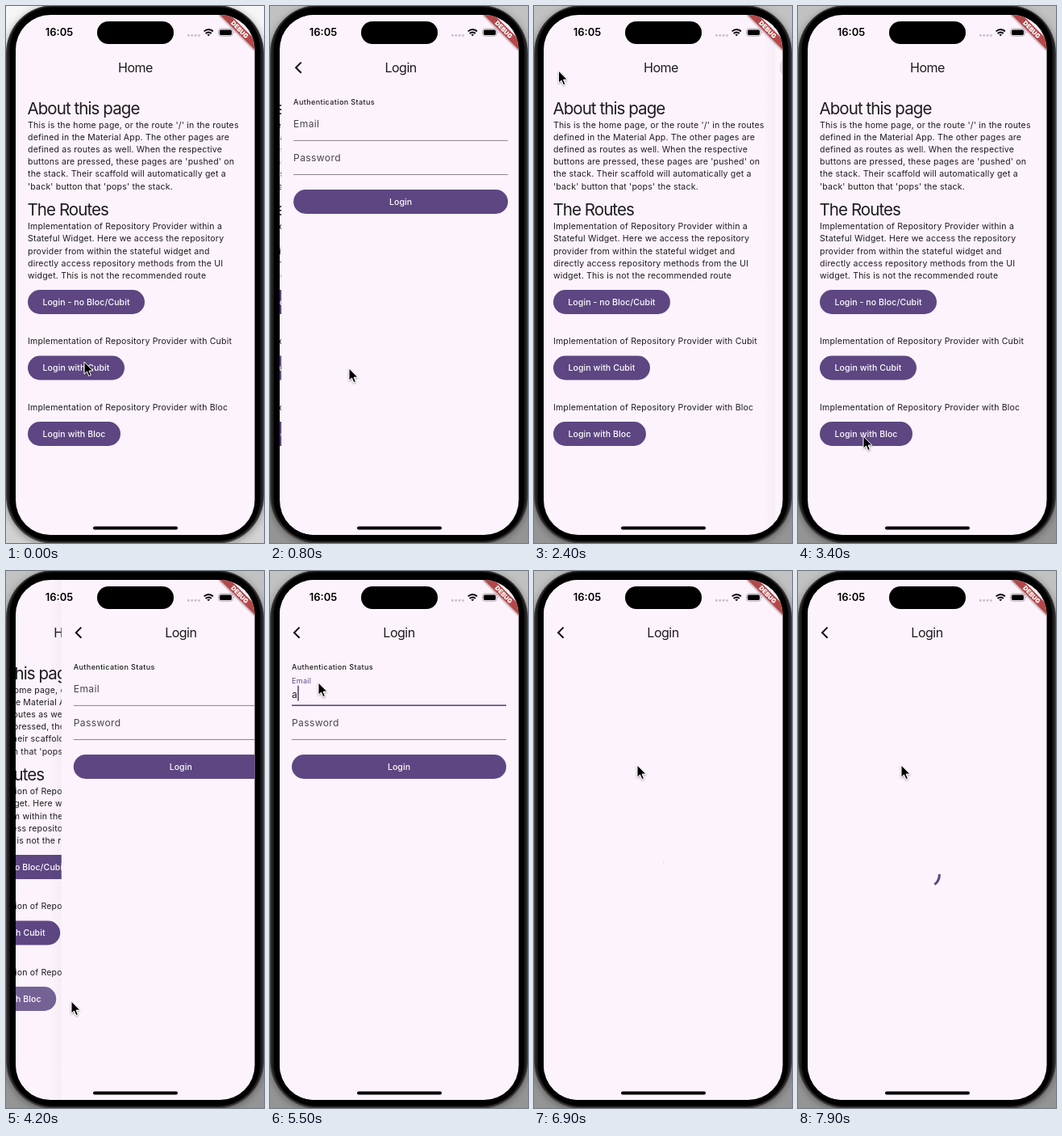
These frames come from a looping animation (320x664 px, 8000 ms). An HTML page:

```html
<!DOCTYPE html>
<html lang="en">
<head>
<meta charset="utf-8">
<title>Login demo</title>
<style>
html, body { margin: 0; width: 100%; height: 100%; overflow: hidden; }
svg { display: block; width: 320px; height: 664px; font-family: Inter, sans-serif; fill: #1d1b20; }
.title { font-size: 16px; letter-spacing: -.5px; text-anchor: middle; }
.head { font-size: 20.5px; letter-spacing: -.92px; }
.body { font-size: 10.54px; letter-spacing: .19px; }
.btn { font-size: 10.54px; letter-spacing: .08px; font-weight: 500; fill: #fff; text-anchor: middle; }
.status { font-size: 9.04px; letter-spacing: .38px; font-weight: 500; }
.field { font-size: 12.05px; letter-spacing: .38px; }
.primary { fill: #5d4682; }
.page { fill: #fdf3fc; }
</style>
</head>
<body>
<svg viewBox="0 0 320 664">
  <defs>
    <clipPath id="screen"><rect x="12" y="11" width="296.5" height="643" rx="43"/></clipPath>
    <linearGradient id="desk" x2="0" y2="1">
      <stop id="deskTop"/><stop id="deskEnd" offset="1"/>
    </linearGradient>
    <linearGradient id="edge">
      <stop stop-opacity="0"/><stop offset="1" stop-opacity=".03"/>
    </linearGradient>
    <filter id="soft" x="-50%" y="-50%" width="200%" height="200%">
      <feDropShadow dx="0" dy="1" stdDeviation="1.2" flood-opacity=".4"/>
    </filter>
    <filter id="shade" x="-10%" y="-10%" width="120%" height="120%">
      <feDropShadow dx="0" dy="2" stdDeviation="5" flood-opacity=".35"/>
    </filter>
  </defs>
  <rect width="320" height="664" fill="url(#desk)"/>
  <rect y="-1" width="320" height="666" rx="59" fill="#454142" filter="url(#shade)"/>
  <rect x="1.5" y="0" width="317" height="663" rx="57" fill="#201e1f"/>
  <rect x="4.5" y="1.5" width="311" height="660" rx="53" fill="#000"/>
  <g clip-path="url(#screen)">
    <g id="home"><rect class="page" x="12" y="11" width="297" height="643"/></g>
    <g id="login">
      <rect x="-3" y="11" width="15" height="643" fill="url(#edge)"/>
      <rect class="page" x="12" y="11" width="297" height="643"/>
      <circle id="backGlow" cx="33" cy="76" r="15.5" fill="#49454f"/>
      <path d="M36.6 69.6L30 76.2l6.6 6.6" fill="none" stroke="#111" stroke-width="2"/>
      <text class="title" x="160" y="82">Login</text>
      <g id="form"><text class="status" x="27" y="121.5">Authentication Status</text></g>
      <path id="arc" fill="none" stroke="#5d4682" stroke-width="3"/>
    </g>
    <g transform="translate(308 11) rotate(45)">
      <rect x="-32" y="21" width="64" height="9.2" fill="#b4474a" filter="url(#soft)"/>
      <text y="28.4" text-anchor="middle" font-size="7.7" font-weight="900" fill="#fff">DEBUG</text>
    </g>
  </g>
  <rect x="113" y="19" width="95" height="28" rx="14" fill="#000"/>
  <text x="66" y="37.3" text-anchor="middle" font-size="13" font-weight="600" fill="#000">16:05</text>
  <path d="M226.2 36.4h13.6" stroke="#c9b8cb" stroke-width="2.8" stroke-linecap="round" stroke-dasharray="0 4.4"/>
  <g fill="none" stroke="#000" stroke-width="1.9">
    <path d="M245.6 31.4q5.6-4.8 11.2 0M247.6 33.9q3.6-3 7.2 0"/>
    <path d="M249.3 35.3q1.9-1.3 3.8 0l-1.9 1.9z" fill="#000" stroke="none"/>
  </g>
  <rect x="263.6" y="28.2" width="17.6" height="9" rx="2.8" fill="none" stroke="#a89ba8" stroke-width=".9"/>
  <rect x="264.9" y="29.5" width="15" height="6.4" rx="1.6" fill="#000"/>
  <path d="M282.3 31.2q1.6 1.5 0 3z" fill="#a89ba8"/>
  <rect x="108" y="643.6" width="105" height="3.8" rx="1.9" fill="#000"/>
  <circle id="ring" r="22" fill="none" stroke="#222" stroke-width="2"/>
  <path id="pointer" d="M0 0v15.2l3.5-3.2 2.4 5.6 2.5-1.1-2.4-5.4h4.9z" fill="#000" stroke="#fff" stroke-width="1" filter="url(#soft)"/>
</svg>
<script>
const $ = id => document.getElementById(id);
const clamp = x => Math.max(0, Math.min(1, x));
const ramp = (t, start, length) => clamp((t - start) / length);

function add(parent, tag, attrs, text = '') {
  const node = document.createElementNS('http://www.w3.org/2000/svg', tag);
  for (const key in attrs) node.setAttribute(key, attrs[key]);
  node.textContent = text;
  return parent.appendChild(node);
}
const lines = (list, y) => list.forEach((line, i) =>
  add(home, 'text', { class: 'body', x: 27, y: y + i * 15.06 }, line));

// Returns the light overlay shown while the button is pressed.
function button(parent, y, width, label) {
  const box = { x: 27, y, width, height: 30, rx: 15 };
  add(parent, 'rect', { ...box, class: 'primary' });
  const glow = add(parent, 'rect', { ...box, fill: '#fff', opacity: 0 });
  add(parent, 'text', { class: 'btn', x: 27 + width / 2, y: y + 18.8 }, label);
  return glow;
}

const home = $('home'), login = $('login'), form = $('form');
add(home, 'text', { class: 'title', x: 160.5, y: 82 }, 'Home');
add(home, 'text', { class: 'head', x: 26.5, y: 134 }, 'About this page');
lines(["This is the home page, or the route '/' in the routes",
  'defined in the Material App. The other pages are',
  'defined as routes as well. When the respective',
  "buttons are pressed, these pages are 'pushed' on",
  'the stack. Their scaffold will automatically get a',
  "'back' button that 'pops' the stack."], 151.2);
add(home, 'text', { class: 'head', x: 26.5, y: 259 }, 'The Routes');
lines(['Implementation of Repository Provider within a',
  'Stateful Widget. Here we access the repository',
  'provider from within the stateful widget and',
  'directly access repository methods from the UI',
  'widget. This is not the recommended route'], 276.4);
lines(['Implementation of Repository Provider with Cubit'], 418.2);
lines(['Implementation of Repository Provider with Bloc'], 499.8);
button(home, 351, 145, 'Login - no Bloc/Cubit');
const cubitGlow = button(home, 432.5, 120, 'Login with Cubit');
const blocGlow = button(home, 514, 115, 'Login with Bloc');
const loginGlow = button(form, 227, 266, 'Login');

function field(label, y, focus, blur, keys) {
  const name = add(form, 'text', { class: 'field' }, label);
  const value = add(form, 'text', { class: 'field', x: 27, y: y - 9.4 });
  const rule = add(form, 'rect', { x: 27, width: 266 });
  const caret = add(form, 'rect', { y: y - 24.5, width: 1.6, height: 19, class: 'primary' });
  return t => {
    const active = t >= focus && t < blur;
    const k = ramp(t, focus, 167), lift = k * k * (3 - 2 * k);
    const typed = keys.filter(key => t >= key);
    const lastInput = Math.max(focus, ...typed);
    name.setAttribute('transform', `translate(27 ${y - 16.1 - 11.6 * lift}) scale(${1 - .25 * lift})`);
    name.setAttribute('fill', active ? '#5d4682' : '#49454f');
    value.textContent = 'asd'.slice(0, typed.length);
    rule.setAttribute('y', active ? y - .8 : y - .3);
    rule.setAttribute('height', active ? 1.6 : .8);
    rule.setAttribute('fill', active ? '#5d4682' : '#6f6a73');
    caret.setAttribute('x', 27 + (typed.length ? value.getComputedTextLength() : 0));
    caret.setAttribute('opacity', +(active && (t - lastInput) % 1000 < 500));
  };
}
const fields = [
  field('Email', 166.2, 5000, 6040, [5420, 5560, 5680]),
  field('Password', 208.4, 6040, 9000, [6260, 6380, 6480])
];

function bezier(x1, y1, x2, y2) {
  const at = (a, b, u) => 3 * a * u * (1 - u) ** 2 + 3 * b * u * u * (1 - u) + u ** 3;
  return x => {
    let low = 0, high = 1;
    for (let i = 0; i < 24; i++) {
      const mid = (low + high) / 2;
      if (at(x1, x2, mid) < x) low = mid; else high = mid;
    }
    return at(y1, y2, low);
  };
}
const standard = bezier(.4, 0, .2, 1);
// Page slide: two cubic pieces that join at (.198, .541).
const JX = .198, JY = .541;
const slideIn = bezier(.056 / JX, .024 / JY, .108 / JX, .3085 / JY);
const slideOut = bezier((.3655 - JX) / (1 - JX), 1, (.5465 - JX) / (1 - JX), (.989 - JY) / (1 - JY));
const slide = x => x <= 0 ? 0 : x >= 1 ? 1 : x < JX ? JY * slideIn(x / JX)
  : JY + (1 - JY) * slideOut((x - JX) / (1 - JX));

const PUSH = 415, POP = 2110, PUSH_AGAIN = 4034.5, LOADING = 6897;
const clicks = [[220, PUSH], [1880, 2150], [3860, PUSH_AGAIN], [4880, 5010], [5960, 6060], [6740, 6890]];
// Pointer moves: start, end, x, y.
const moves = [[480, 760, 98, 448], [1120, 1800, 30.5, 80], [2480, 3000, 81, 532],
  [4260, 4780, 60, 138], [5740, 5930, 60, 180], [6500, 6690, 128, 240]];

function pointerAt(t) {
  let x = 97, y = 440;
  for (const [start, end, toX, toY] of moves) {
    const k = ramp(t, start, end - start), e = k * k * (3 - 2 * k);
    x += (toX - x) * e;
    y += (toY - y) * e;
  }
  return [x, y];
}
const pressed = (t, [down, up]) => ramp(t, down, 130) * (1 - ramp(t, up + 250, 200));

function spinner(t) {
  const p = t / 1333 % 1;
  const head = standard(clamp(p * 2)), tail = standard(clamp(p * 2 - 1));
  const from = Math.PI * (-.5 + 1.5 * tail + t / 2222 * 2 + t / 1333 * .5);
  const sweep = Math.max(1.5 * Math.PI * (head - tail), .01);
  const point = a => `${160 + 15.4 * Math.cos(a)} ${375.5 + 15.4 * Math.sin(a)}`;
  return `M${point(from)}A15.4 15.4 0 ${+(sweep > Math.PI)} 1 ${point(from + sweep)}`;
}

function draw(t) {
  const front = t >= 230;
  $('deskTop').setAttribute('stop-color', front ? '#c2c2c2' : '#f6f6f6');
  $('deskEnd').setAttribute('stop-color', front ? '#949494' : '#d2d2d2');

  const shown = slide((t - PUSH) / 500) - slide((t - POP) / 500) + slide((t - PUSH_AGAIN) / 500);
  home.setAttribute('transform', `translate(${-98.7 * shown} 0)`);
  login.setAttribute('transform', `translate(${296.5 * (1 - shown)} 0)`);
  login.setAttribute('visibility', shown > 0 ? 'visible' : 'hidden');

  cubitGlow.setAttribute('opacity', .15 * pressed(t, clicks[0]));
  $('backGlow').setAttribute('opacity', .13 * pressed(t, clicks[1]));
  blocGlow.setAttribute('opacity', .15 * pressed(t, clicks[2]));
  loginGlow.setAttribute('opacity', .15 * pressed(t, clicks[5]));

  const loading = t >= LOADING;
  form.setAttribute('display', loading ? 'none' : 'inline');
  $('arc').setAttribute('d', loading ? spinner(t - LOADING + 8) : '');
  fields.forEach(update => update(t));

  const [x, y] = pointerAt(t);
  $('pointer').setAttribute('transform', `translate(${x} ${y})`);
  $('ring').setAttribute('transform', `translate(${x - .5} ${y + 1})`);
  $('ring').setAttribute('opacity', +clicks.some(([down, up]) => t >= down && t < up));
}

const began = performance.now();
function tick() {
  draw((performance.now() - began) % 8000);
  requestAnimationFrame(tick);
}
tick();
</script>
</body>
</html>
```
